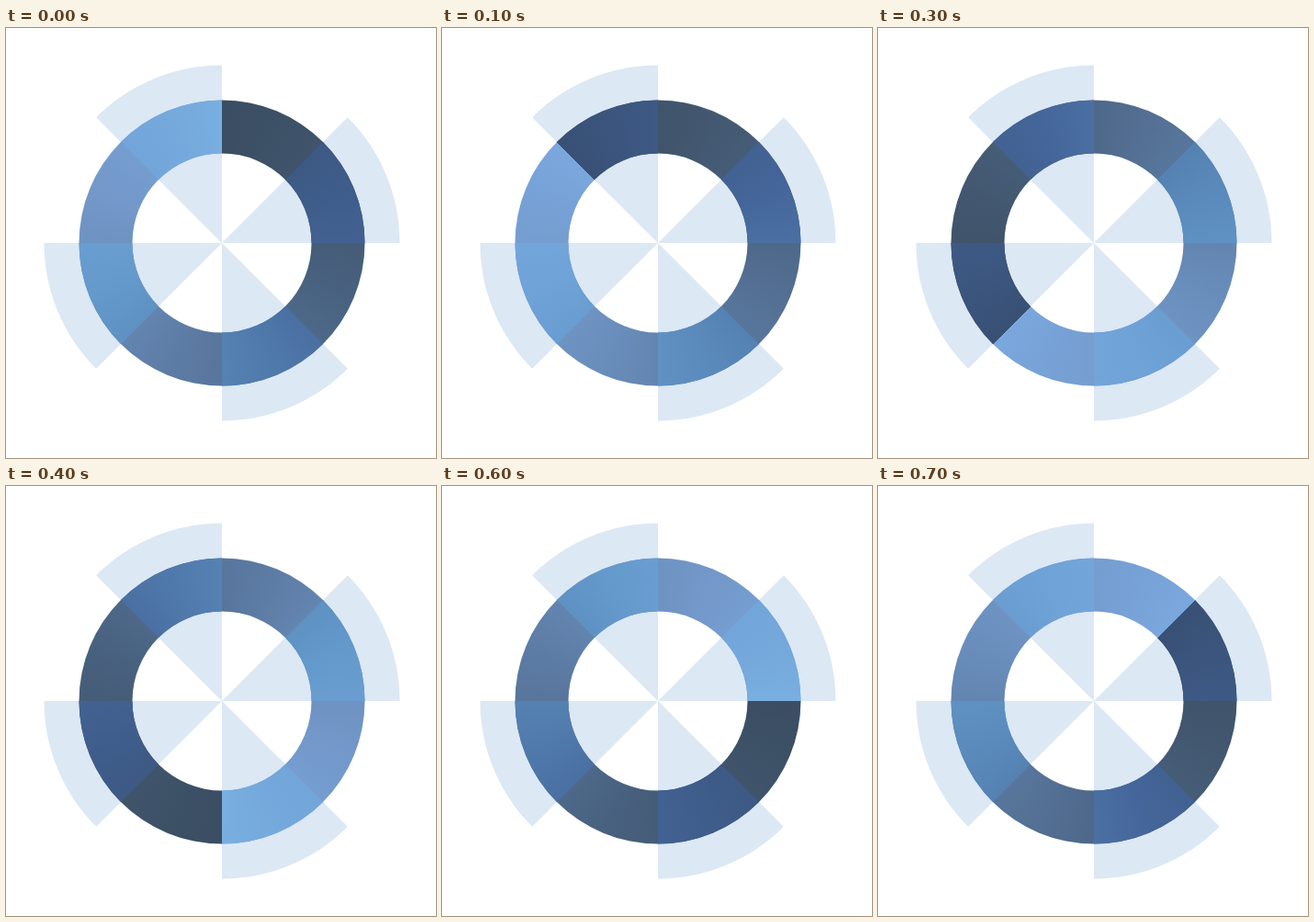
Animation, 468 px wide and 468 px high, one loop 0.8 s. Source, as an HTML page with a canvas:

```html
<!DOCTYPE html>
<html lang="en">
<head>
<meta charset="utf-8">
<title>Spinning ring</title>
<style>
  html, body { margin: 0; width: 100%; height: 100%; overflow: hidden; background: #fff; }
  canvas { display: block; width: 468px; height: 468px; }
</style>
</head>
<body>
<canvas id="stage" width="468" height="468"></canvas>
<script>
const ctx = document.getElementById('stage').getContext('2d');
const CX = 235, CY = 234;
const OUTER = 155.5, INNER = 97.5, BLADE = 193.5;
const EIGHTH = Math.PI / 4, TOP = -Math.PI / 2;
const STEP_MS = 100, STEPS = 8;

// Ring shades from the dark end to the light end, clockwise.
const plain = ['#3b4d63', '#3c5066', '#435870', '#48617f', '#536f93',
               '#5d7ca5', '#698dbb', '#7398c9', '#77a2d7', '#7aa7dd'];
const tinted = ['#395075', '#3b557d', '#3f5d8b', '#45669a', '#5079ab',
                '#5a8abb', '#6499cb', '#6fa2d7', '#75a9dc', '#79aee0'];

function sweep(shades, start) {
  const gradient = ctx.createConicGradient(start, CX, CY);
  const last = shades.length - 1;
  shades.forEach((shade, i) => {
    const at = i === 0 ? 0 : i === last ? 1 : (i - 0.5) / (last - 1);
    gradient.addColorStop(at, shade);
  });
  return gradient;
}

function sector(from, to, inner, outer) {
  ctx.moveTo(CX + outer * Math.cos(from), CY + outer * Math.sin(from));
  ctx.arc(CX, CY, outer, from, to);
  ctx.lineTo(CX + inner * Math.cos(to), CY + inner * Math.sin(to));
  if (inner) ctx.arc(CX, CY, inner, to, from, true);
  ctx.closePath();
}

function blades(inner, outer, fill) {
  ctx.beginPath();
  for (let i = 1; i < 8; i += 2) {
    sector(TOP + i * EIGHTH, TOP + (i + 1) * EIGHTH, inner, outer);
  }
  ctx.fillStyle = fill;
  ctx.fill();
}

function draw(time) {
  const step = Math.floor(time / STEP_MS) % STEPS;
  const start = TOP - step * EIGHTH;

  ctx.fillStyle = '#fff';
  ctx.fillRect(0, 0, 468, 468);
  blades(0, BLADE, '#dce8f4');

  ctx.beginPath();
  ctx.arc(CX, CY, OUTER, 0, 2 * Math.PI);
  ctx.moveTo(CX + INNER, CY);
  ctx.arc(CX, CY, INNER, 0, 2 * Math.PI, true);
  ctx.fillStyle = sweep(plain, start);
  ctx.fill();

  blades(INNER, OUTER, sweep(tinted, start));
}

const began = performance.now();
function tick() {
  draw(performance.now() - began);
  requestAnimationFrame(tick);
}
tick();
</script>
</body>
</html>
```
